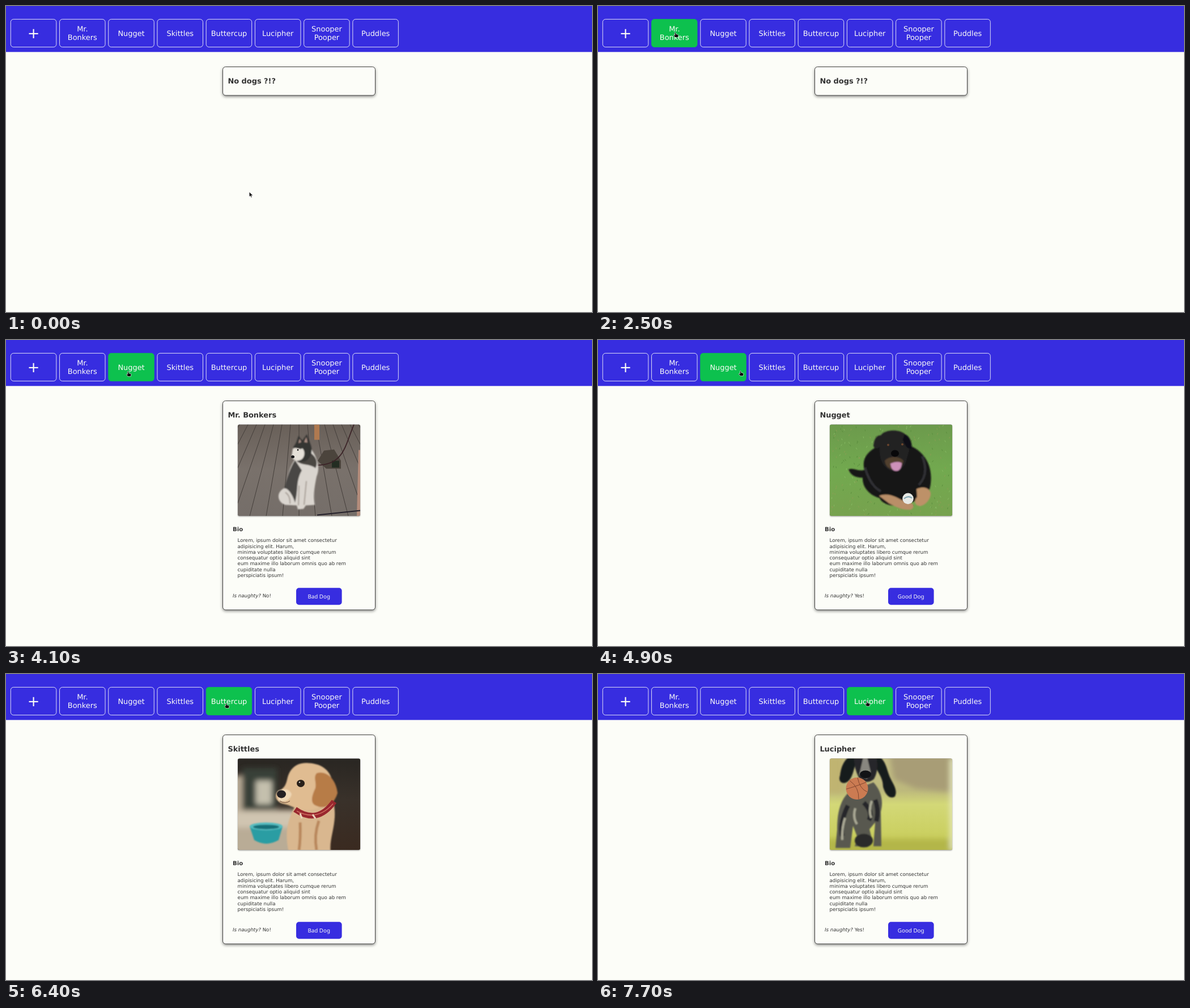
Animation of 1034 by 541 pixels, one loop 8000 ms. Source, as an HTML page:

```html
<!DOCTYPE html>
<html lang="en">
<head>
<meta charset="utf-8">
<title>Dogs</title>
<style>
  html, body { margin: 0; width: 100%; height: 100%; overflow: hidden; background: #fcfdf8; }
  svg { display: block; width: 100%; height: 100%; }
  text { font: 12.92px 'DejaVu Sans', sans-serif; fill: #333; text-rendering: geometricPrecision; }
  #nav text { fill: #fbfcf7; text-anchor: middle; }
  #nav .plus { font-size: 25.85px; }
  #nav rect { stroke-width: .9; }
  #title, #bio { font-weight: bold; }
  #bio { font-size: 10.08px; }
  .small { font-size: 8.616px; }
  .small .it { font-style: oblique; }
  #action { font: 9.8px 'Noto Sans', 'Open Sans', sans-serif; fill: #fbfcf7; text-anchor: middle; }
  #card { filter: drop-shadow(0 2.5px 2.7px rgba(0, 0, 0, .45)); }
  #frame { filter: drop-shadow(0 1px 1.3px rgba(0, 0, 0, .4)); }
  .hide { display: none; }
</style>
</head>
<body>
<svg viewBox="0 0 1034 541">
  <defs>
    <clipPath id="crop"><rect width="216" height="161.7" rx="3"/></clipPath>
    <filter id="soft" x="-30%" y="-30%" width="160%" height="160%"><feGaussianBlur stdDeviation="5"/></filter>
    <filter id="fur" x="-10%" y="-10%" width="120%" height="120%"><feGaussianBlur stdDeviation=".8"/></filter>
    <linearGradient id="wood" x2="0" y2="1"><stop stop-color="#696059"/><stop offset=".5" stop-color="#79716b"/><stop offset="1" stop-color="#756e69"/></linearGradient>
    <linearGradient id="grass" x2="0" y2="1"><stop stop-color="#6c9a4c"/><stop offset=".5" stop-color="#72a94f"/><stop offset="1" stop-color="#77a24e"/></linearGradient>
    <linearGradient id="room" x2="0" y2="1"><stop stop-color="#292622"/><stop offset=".45" stop-color="#39312a"/><stop offset="1" stop-color="#3a2a20"/></linearGradient>
    <linearGradient id="forest" x2="0" y2="1"><stop stop-color="#665c50"/><stop offset=".4" stop-color="#4b4339"/><stop offset="1" stop-color="#3b302a"/></linearGradient>
    <linearGradient id="meadow" x2="0" y2="1"><stop stop-color="#c3bd86"/><stop offset=".35" stop-color="#bdb97c"/><stop offset=".5" stop-color="#d3d877"/><stop offset="1" stop-color="#c6cb55"/></linearGradient>
  </defs>

  <rect width="1034" height="81.3" fill="#372de0"/>
  <g id="nav"></g>

  <rect id="card" x="382.5" y="107.6" width="269" rx="5" fill="#fcfdf8" stroke="#333" stroke-width=".9"/>
  <text id="title" x="391.4" y="137.3"></text>

  <g id="detail">
    <rect id="frame" x="409" y="149.4" width="216" height="161.7" rx="3" fill="#777"/>
    <g transform="translate(409 149.4)"><g id="photos" clip-path="url(#crop)">
      <g>
        <rect width="216" height="162" fill="url(#wood)"/>
        <g id="planks" stroke="#453f3b" stroke-width="1"></g>
        <path d="M135 0h9v27h-9z" fill="#af7950"/>
        <path d="M152 46l18-2 12 20v14h-26l-15-14z" fill="#4b443c"/>
        <path d="M166 64h13v12h-13z" fill="#232d22"/>
        <path d="M213 45h3v117h-6z" fill="#b48c7b"/>
        <path d="M140 160l76-8" stroke="#24202a" stroke-width="2"/>
        <path d="M205 0C189 38 187 72 139 72" fill="none" stroke="#3b2327" stroke-width="1.8"/>
        <g filter="url(#fur)">
          <path d="M102 60C92 72 88 90 83 112 68 118 68 137 84 142L104 143 106 150 116 149 120 143 136 142C133 125 135 112 139 92 146 76 140 58 130 44z" fill="#dad5cf"/>
          <path d="M101 63C91 78 87 96 82 113 91 112 99 131 101 138 107 116 102 100 113 81z" fill="#494644"/>
          <path d="M128 50C141 58 141 71 137 77 127 69 115 73 104 65z" fill="#4b4643"/>
          <path d="M98 40L103 32 107 20 114 28 122 17 128 34C133 45 130 59 119 65 109 67 103 63 97 60z" fill="#363433"/>
          <path d="M97 43C104 39 109 46 114 42 119 47 119 57 112 62 105 66 97 63 95 56z" fill="#e5e0d8"/>
          <path d="M109 25l3 6-5 2zM121 22l2 10-6-1z" fill="#aa8e83"/>
          <path d="M108 108l-1 35M121 100l-4 42M84 120q9 6 8 20" stroke="#a59c94" stroke-width="2" fill="none"/>
        </g>
        <ellipse cx="97" cy="57" rx="3" ry="2.5" fill="#171719"/><circle cx="106" cy="45" r="1.3" fill="#111"/>
      </g>
      <g>
        <rect width="216" height="162" fill="url(#grass)"/>
        <g id="blades"></g>
        <g filter="url(#fur)">
          <path d="M33 79C44 76 51 84 61 80 55 56 73 45 83 39L143 38C165 48 182 70 178 104 177 119 169 128 157 133L132 142C110 147 92 140 88 130 72 126 57 112 58 94 45 94 36 89 33 79z" fill="#171719"/>
          <path d="M90 19C98 8 124 8 134 18 143 30 142 42 136 60 132 79 122 83 109 82 91 76 87 56 88 39 84 44 79 43 77 38 78 26 82 19 90 19z" fill="#212022"/>
          <path d="M132 17C142 20 146 35 144 42 138 45 132 36 129 27z" fill="#111113"/>
          <path d="M87 126C104 119 120 130 134 137 148 137 151 145 144 150 129 153 116 145 104 139z" fill="#b98e67"/>
          <path d="M153 114C166 108 177 113 178 122 178 132 169 143 159 144 149 143 148 134 154 128z" fill="#bd9168"/>
          <path d="M97 64C105 55 122 55 130 64 129 72 122 81 113 80 103 78 98 73 97 64z" fill="#51402f"/>
          <path d="M107 69q12-5 20-1c0 9-5 15-10 14-6 0-9-5-10-13z" fill="#cd91b9"/>
          <path d="M62 76q9 32 28 42M163 56q13 31-6 51" fill="none" stroke="#303035" stroke-width="4"/>
        </g>
        <ellipse cx="115" cy="51" rx="7" ry="6" fill="#08080a"/>
        <circle cx="103" cy="36" r="2" fill="#69442c"/><circle cx="128" cy="35" r="2" fill="#69442c"/>
        <circle cx="138" cy="131" r="9.8" fill="#e7e9e5"/><path d="M131 131q7-6 14-1" fill="none" stroke="#81a5b2" stroke-width="2"/>
      </g>
      <g>
        <rect width="216" height="162" fill="url(#room)"/>
        <g filter="url(#soft)">
          <path d="M-9 30h19v60h92v80H-9z" fill="#b9ac96"/>
          <path d="M8 17h61v74H8z" fill="#384137"/>
          <path d="M32 39h28v42H32z" fill="#c4c0ad"/>
          <path d="M-8 94h113v28H-8z" fill="#d0c5b1"/>
        </g>
        <g filter="url(#fur)">
          <path d="M21 120q28-11 58 0l-7 24q-22 13-43 0z" fill="#299da3"/>
          <ellipse cx="50" cy="120" rx="29" ry="7" fill="#55bcc0"/><ellipse cx="50" cy="121" rx="23" ry="4" fill="#197078"/>
          <path d="M102 82C88 108 82 131 90 166H164C160 140 177 114 169 78z" fill="#d9b78f"/>
          <path d="M110 113q1 29-2 49M143 110q-9 26-4 52" fill="none" stroke="#b9885d" stroke-width="5"/>
          <path d="M88 33C93 15 107 6 125 8 150 9 165 23 167 43 169 69 150 94 115 91 101 89 94 83 84 81 69 79 63 68 70 58 83 53 85 46 88 33z" fill="#e0bc91"/>
          <path d="M139 26C158 20 174 39 176 61 170 82 153 90 140 84 126 80 131 65 137 52 139 41 133 33 139 26z" fill="#b77b46"/>
          <path d="M71 57q17-8 24 6-5 16-23 12z" fill="#efd8b6"/>
        </g>
        <path d="M101 90Q140 118 170 76" fill="none" stroke="#99272e" stroke-width="10"/>
        <path d="M104 93Q140 112 168 80" fill="none" stroke="#d67767" stroke-width="1.3"/>
        <path d="M110 97l3 9M132 99l5 7" stroke="#ead3bd" stroke-width="3"/>
        <ellipse cx="77" cy="63" rx="8" ry="7" fill="#242123"/><path d="M74 75q10 6 18 0" fill="none" stroke="#674737"/>
        <ellipse cx="111" cy="44" rx="7" ry="6.5" fill="#292019"/><circle cx="109" cy="42" r="1.2" fill="#dce0df"/>
      </g>
      <g>
        <rect width="216" height="162" fill="url(#forest)"/>
        <g filter="url(#soft)">
          <ellipse cx="75" cy="3" rx="51" ry="14" fill="#a88c75"/>
          <path d="M180 30h36v72h-48z" fill="#5b513f"/>
          <circle cx="44" cy="43" r="8" fill="#b75c35"/><circle cx="13" cy="118" r="10" fill="#c66233"/><circle cx="5" cy="70" r="7" fill="#92492f"/>
          <path d="M0 145h44v20H0zM177 145h40v20h-40z" fill="#604331"/>
        </g>
        <path d="M153 15l8-2 1-7 8 6 12-7-2 10 7 3-10 3-9 6-4-4-10 4 3-7z" fill="#cc6740"/>
        <path d="M179 82l10-8 7 3 10 2-4 7 3 6-12 3-8-6z" fill="#d37548"/>
        <g filter="url(#fur)">
          <path d="M48 90C34 112 31 142 35 166H178C183 137 173 110 162 88z" fill="#bd804d"/>
          <path d="M73 30C54 39 51 61 45 88 49 103 68 101 79 88L132 88C144 99 165 89 168 78 158 56 154 36 137 28z" fill="#b57b49"/>
          <path d="M73 35C79 7 130 7 139 34 146 61 137 91 128 103 115 118 93 118 82 102 70 88 66 61 73 35z" fill="#d9a469"/>
          <path d="M98 20q-4 30 0 44h15q7-27 1-44z" fill="#e5b77d"/>
          <path d="M84 80Q106 66 126 80L125 102Q106 121 87 102z" fill="#c3915f"/>
          <path d="M83 97q21-12 42-1-2 20-18 22-21-2-24-21z" fill="#392520"/>
          <path d="M86 103q17-6 39 0c0 19-5 34-19 34-14-1-20-15-20-34z" fill="#bb6f8a"/>
          <path d="M106 104v24" stroke="#8d4866" stroke-width="1.5"/>
          <path d="M59 103q-8 30 5 59M148 101q8 30-5 58" stroke="#d39b61" stroke-width="8" fill="none"/>
        </g>
        <path d="M90 67q0-9 16-9 16 0 17 9-2 15-17 17-14-2-16-17z" fill="#222023"/>
        <ellipse cx="80" cy="46" rx="6" ry="5" fill="#2c1d17"/><ellipse cx="130" cy="45" rx="6" ry="5" fill="#2c1d17"/>
      </g>
      <g>
        <rect width="216" height="162" fill="url(#meadow)"/>
        <g filter="url(#soft)">
          <path d="M105-9h121v69l-74-7-39-16z" fill="#a89d76"/>
          <path d="M-9-9h33v70H-9z" fill="#c0b471"/>
          <path d="M-9 142h237v30H-9z" fill="#b3b648"/>
          <path d="M212 0h9v162h-9z" fill="#e5e7bb"/>
        </g>
        <g filter="url(#fur)">
          <path d="M33 60C16 76 13 102 13 126L10 158H36L41 119 49 140 44 155 67 156 75 145 70 125 80 113 77 155H91L90 94C96 71 88 54 77 42z" fill="#59594f"/>
          <path d="M32 83q-15 31-10 54M60 78q17 17 9 31M80 73q7 19 2 38" fill="none" stroke="#25272a" stroke-width="8"/>
          <path d="M45 88q-5 16 3 28M27 105q-6 17-5 39M74 75q-6 16-1 30" fill="none" stroke="#aaa995" stroke-width="4"/>
          <path d="M38-6C25 2 20 14 18 30 15 38 19 45 27 43 41 39 42 16 47 6L78 7C84 26 94 32 94 50 98 64 106 73 115 67 120 56 112 45 108 37 100 22 101 6 86-5z" fill="#191a1d"/>
          <path d="M43-3H82Q87 20 78 36 65 47 52 35 42 17 43-3z" fill="#28282a"/>
          <path d="M59-2h7l6 25-7 13-13-8z" fill="#88867f"/>
          <ellipse cx="60" cy="145" rx="16" ry="12" fill="#292b2a"/>
        </g>
        <circle cx="48" cy="53" r="19.5" fill="#cb7b52"/>
        <path d="M35 39q17 12 16 33M49 34q4 20 17 25M29 54q15-4 35-12" fill="none" stroke="#81462f"/>
        <ellipse cx="63" cy="28" rx="10" ry="7" fill="#121316"/>
      </g>
    </g></g>

    <text id="bio" x="400" y="338">Bio</text>
    <g id="lorem"></g>
    <text class="small" x="400" y="454.9"><tspan class="it">Is naughty?</tspan> <tspan id="naughty"></tspan></text>
    <rect x="512" y="438.2" width="80.6" height="30" rx="5" fill="#372de0"/>
    <text id="action" x="552.2" y="457"></text>
  </g>

  <g id="cursor" fill="#080808" stroke="#fff" stroke-width=".6" stroke-linejoin="round">
    <path d="M0 0V8.6L2 6.9 3.5 10 4.9 9.4 3.5 6.4H6.4z"/>
    <path d="M2.4 1Q3.6-.2 4.2 1.3L4.7 3.7 8 4.4Q9.2 4.8 8.9 6L8.2 9.6H3.2L.5 6.3Q0 5 1.3 5.1L2.7 5.9z"/>
  </g>
</svg>
<script>
const $ = id => document.getElementById(id);
const LOOP = 8000, TICK = 100, FADE = 400;
const BLUE = [55, 45, 224], GREEN = [13, 193, 78], WHITE = [240, 241, 250];

const labels = ['+', 'Mr. Bonkers', 'Nugget', 'Skittles', 'Buttercup', 'Lucipher', 'Snooper Pooper', 'Puddles'];
const lorem = ['Lorem, ipsum dolor sit amet consectetur', 'adipisicing elit. Harum,',
  'minima voluptates libero cumque rerum', 'consequatur optio aliquid sint',
  'eum maxime illo laborum omnis quo ab rem', 'cupiditate nulla', 'perspiciatis ipsum!'];

// Button index: [pointer enters, pointer leaves]
const hovers = { 1: [1850, 3560], 2: [3640, 4910], 3: [4930, 5920], 4: [5970, 6980], 5: [7045, 9000] };

// Chosen dog: text time, photo time, naughty
const dogs = [
  { from: 3100, photo: 3100, bad: false },
  { from: 4500, photo: 4500, bad: true },
  { from: 5700, photo: 5700, bad: false },
  { from: 6600, photo: 6700, bad: true },
  { from: 7700, photo: 7700, bad: true }
];

// Pointer: time, x, y
const path = [
  [0, 429.2, 328.7], [1400, 333, 242], [1600, 282, 190], [1700, 212, 125], [1800, 164, 77],
  [1900, 143, 58], [2000, 137, 50], [2500, 133, 46], [3600, 176, 52], [3700, 203, 55],
  [3800, 212, 55], [4800, 228, 55], [4900, 248, 54], [5000, 285, 53], [5100, 300, 52],
  [5900, 332, 52], [6000, 365, 51], [6100, 380, 51], [6200, 385, 51],
  [7000, 424, 52], [7100, 449, 52], [7200, 467, 49], [7300, 471, 47.5]
];
const HAND_FROM = 1900;

$('nav').innerHTML = labels.map((label, i) => {
  const x = 8.3 + 86.22 * i, mid = x + 40.3;
  const lines = label.split(' ');
  const text = lines.map((word, n) => {
    const y = i === 0 ? 56.9 : lines.length > 1 ? 44.9 + 15.3 * n : 52.8;
    return `<text x="${mid}" y="${y}"${i ? '' : ' class="plus"'}>${word}</text>`;
  }).join('');
  return `<rect x="${x}" y="23.4" width="80.5" height="49.2" rx="5"/>${text}`;
}).join('');
const boxes = $('nav').querySelectorAll('rect');

$('lorem').innerHTML = lorem.map((line, i) =>
  `<text class="small" x="408.6" y="${357.4 + 10.23 * i}">${line}</text>`).join('');

$('planks').innerHTML = Array.from({ length: 25 }, (_, i) =>
  `<path d="M${108 + (i - 12) * 15} 0L${108 + (i - 12) * 29} 162"/>`).join('');

let seed = 7;
const random = () => (seed = seed * 16807 % 2147483647) / 2147483647;
$('blades').innerHTML = Array.from({ length: 260 }, () => {
  const color = ['#588c3d', '#8abd66', '#8f9d55'][Math.floor(random() * 3)];
  return `<path d="M${random() * 216} ${random() * 162}l${random() * 4 - 2}-3" stroke="${color}" stroke-width=".9"/>`;
}).join('');

// CSS "ease": cubic-bezier(.25, .1, .25, 1)
function ease(x) {
  if (x <= 0 || x >= 1) return x <= 0 ? 0 : 1;
  const curve = (u, a, b) => 3 * (1 - u) ** 2 * u * a + 3 * (1 - u) * u * u * b + u ** 3;
  let low = 0, high = 1;
  for (let i = 0; i < 20; i++) {
    const u = (low + high) / 2;
    if (curve(u, .25, .25) < x) low = u; else high = u;
  }
  return curve(low, .1, 1);
}

const mix = (a, b, k) => `rgb(${a.map((v, i) => Math.round(v + (b[i] - v) * k))})`;
const toggle = (node, on) => node.classList.toggle('hide', !on);

function draw(t) {
  boxes.forEach((box, i) => {
    const [enter, leave] = hovers[i] || [Infinity, Infinity];
    const k = ease((t - enter) / FADE) - ease((t - leave) / FADE);
    box.setAttribute('fill', mix(BLUE, GREEN, k || 0));
    box.setAttribute('stroke', mix(WHITE, GREEN, k || 0));
  });

  const chosen = dogs.filter(d => t >= d.from).length;
  const photo = dogs.filter(d => t >= d.photo).length;
  const dog = dogs[chosen - 1];
  $('title').textContent = dog ? labels[chosen] : 'No dogs ?!?';
  $('card').setAttribute('height', dog ? 369.5 : 50.4);
  toggle($('detail'), dog);
  if (dog) {
    $('naughty').textContent = dog.bad ? 'Yes!' : 'No!';
    $('action').textContent = dog.bad ? 'Good Dog' : 'Bad Dog';
  }
  [...$('photos').children].forEach((pic, i) => toggle(pic, i === photo - 1));

  const [, x, y] = path.filter(p => t >= p[0]).pop();
  const [arrow, hand] = $('cursor').children;
  $('cursor').setAttribute('transform', `translate(${x} ${y})`);
  toggle(arrow, t < HAND_FROM);
  toggle(hand, t >= HAND_FROM);
}

const start = performance.now();
function loop() {
  const now = (performance.now() - start) % LOOP;
  draw(Math.floor(now / TICK) * TICK);
  requestAnimationFrame(loop);
}
loop();
</script>
</body>
</html>
```
